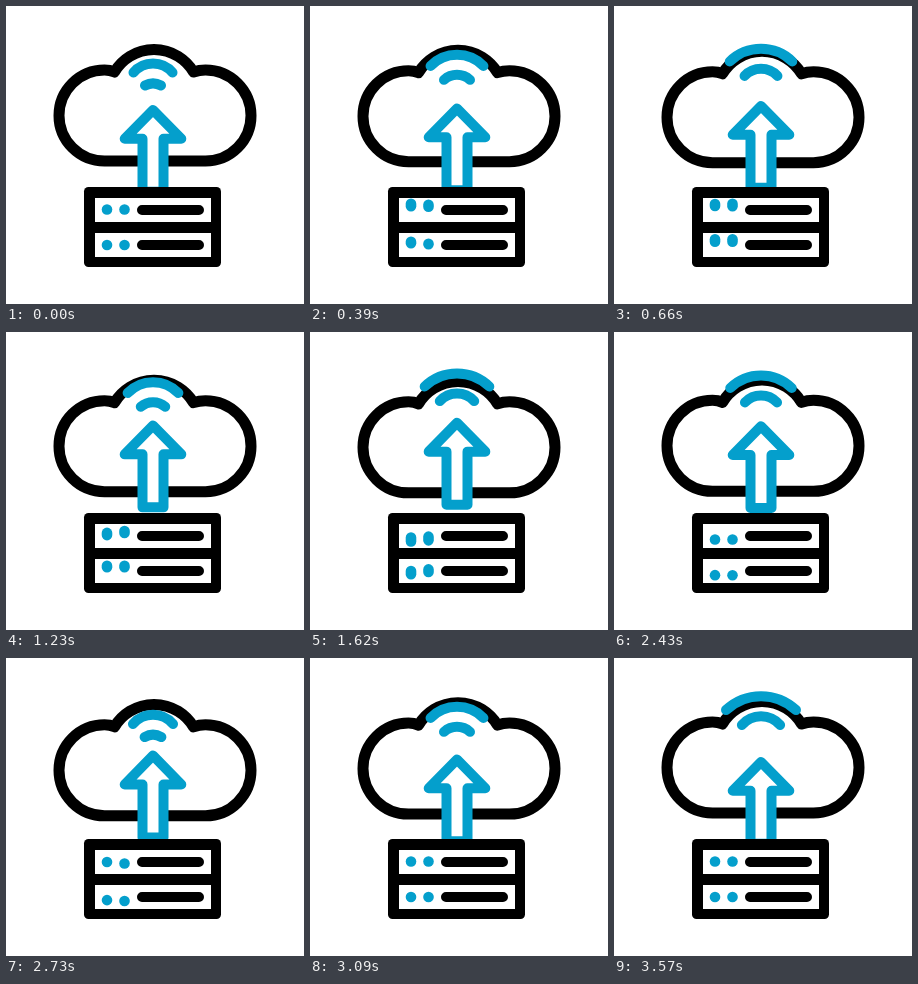
These frames come from a looping animation (298 by 298 pixels, 3600 ms). An HTML page:

```html
<!DOCTYPE html>
<html lang="en">
<head>
<meta charset="utf-8">
<title>Cloud upload</title>
<style>
  html, body { margin: 0; width: 100%; height: 100%; overflow: hidden; background: #fff; }
  svg { display: block; width: 100vw; height: 100vh; }
  .line { fill: #fff; stroke: #000; stroke-width: 10; stroke-linecap: round; stroke-linejoin: round; }
  .blue { fill: none; stroke: #049fcc; stroke-width: 10; stroke-linecap: round; stroke-linejoin: round; }
  .led { fill: #049fcc; }
</style>
</head>
<body>
<svg viewBox="0 0 298 298">
  <path id="cloud" class="line" style="stroke-width:11" d="M98.5 155A45.5 45.5 0 0 1 98.5 64Q104 64 108.5 66A46 46 0 0 1 187.5 66Q193 64 199.5 64A45.5 45.5 0 0 1 199.5 155Z"/>
  <path id="arrow" class="blue" style="fill:#fff" d="M147 104L118.7 132.8H136.5V185.8H157.5V132.8H175.3Z"/>
  <rect x="78" y="181" width="137" height="80" rx="4.5"/>
  <path fill="#fff" d="M89 192H205V216H89ZM89 227H205V251H89Z"/>
  <path class="line" d="M136 204H193M136 239H193"/>
  <g id="leds"></g>
  <path id="inner" class="blue"/>
  <path id="outer" class="blue"/>
</svg>
<script>
const LOOP = 3600, PULSE = 900, CX = 147;
const $ = id => document.getElementById(id);
const wave = p => (1 - Math.cos(Math.PI * p)) / 2;
const mix = (a, b, p) => a + (b - a) * p;

// Arc stages: half width, end y, peak y
const small = [8, 79.5, 77.5], medium = [19.5, 66.5, 57.5], large = [35.5, 51.5, 37.5];

// LED track: time, vertical shift, stretch
const track = [
  [0, 0, 0], [390, -4.5, 1.2], [1050, -4.5, 0.8], [1230, -1.5, 1.1],
  [1620, 4, 2], [1850, 4.5, 0.6], [2100, 4.3, 0], [2430, 4, 0],
  [2820, 0, 0], [LOOP, 0, 0]
];

// LEDs: x, y, delay
const leds = [[101, 203.5, 0], [118.5, 203.5, 110], [101, 239, 180], [118.5, 239, 270]]
  .map(([x, y, delay]) => {
    const el = document.createElementNS("http://www.w3.org/2000/svg", "rect");
    const r = 5.3;
    const attrs = { class: "led", x: x - r, width: 2 * r, rx: r, ry: r };
    for (const k in attrs) el.setAttribute(k, attrs[k]);
    $("leds").append(el);
    return { el, y, delay, r };
  });

function sample(t) {
  const i = Math.max(1, track.findIndex(k => k[0] >= t));
  const a = track[i - 1], b = track[i];
  const p = wave((t - a[0]) / (b[0] - a[0]));
  return [mix(a[1], b[1], p), mix(a[2], b[2], p)];
}

function drawArc(el, from, to, p) {
  const [w, end, peak] = from.map((v, i) => mix(v, to[i], p));
  const h = end - peak, r = (w * w + h * h) / (2 * h);
  el.setAttribute("d", `M${CX - w} ${end}A${r} ${r} 0 0 1 ${CX + w} ${end}`);
}

function render(t) {
  const sway = wave(2 * t / LOOP);
  $("cloud").setAttribute("transform", `translate(0 ${6 * sway})`);
  $("arrow").setAttribute("transform", `translate(0 ${-13.5 * sway})`);

  const p = (t % PULSE) / PULSE;
  drawArc($("inner"), small, medium, p);
  drawArc($("outer"), medium, large, p);

  for (const { el, y, delay, r } of leds) {
    const [dy, stretch] = sample((t - delay + LOOP) % LOOP);
    el.setAttribute("y", y + dy - r - stretch);
    el.setAttribute("height", 2 * (r + stretch));
  }
}

const start = performance.now();
function tick() {
  render((performance.now() - start) % LOOP);
  requestAnimationFrame(tick);
}
tick();
</script>
</body>
</html>
```
